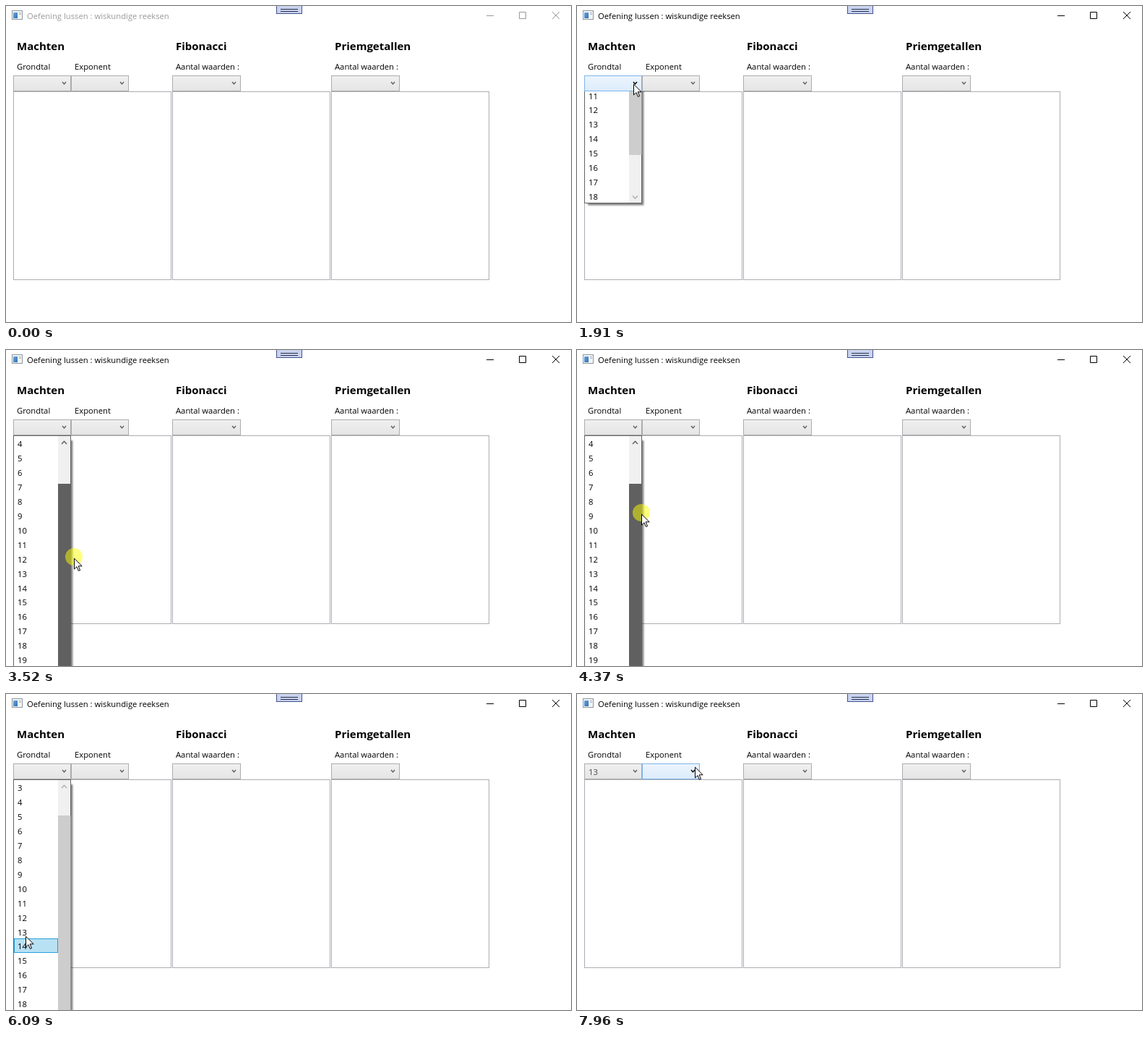
These frames come from a looping animation (782 by 437 pixels, 8000 ms). An HTML page:

```html
<!DOCTYPE html>
<html lang="nl">
<head>
<meta charset="utf-8">
<title>Oefening lussen</title>
<style>
  html, body { margin: 0; width: 100%; height: 100%; overflow: hidden; background: #fff; }
  svg { display: block; }
  text { font: 11.25px "Open Sans", "Noto Sans", sans-serif; fill: #000; white-space: pre; }
  .head { font-size: 15px; font-weight: 700; }
  .line { fill: none; }
</style>
</head>
<body>
<svg id="stage" width="782" height="437" viewBox="0 0 782 437">
  <defs>
    <linearGradient id="plain" x2="0" y2="1">
      <stop stop-color="#f0f0f0"/><stop offset="1" stop-color="#e5e5e5"/>
    </linearGradient>
    <linearGradient id="hover" x2="0" y2="1">
      <stop stop-color="#ecf4fc"/><stop offset="1" stop-color="#dcecfc"/>
    </linearGradient>
    <linearGradient id="pane" x2="1" y2="1">
      <stop stop-color="#6aa9dc"/><stop offset="1" stop-color="#2f6db5"/>
    </linearGradient>
    <filter id="soft" x="-20%" y="-5%" width="140%" height="110%">
      <feGaussianBlur stdDeviation="1.2"/>
    </filter>
    <clipPath id="below"><rect x="10" y="118" width="100" height="400"/></clipPath>
  </defs>
  <rect width="782" height="437" fill="#fff"/>

  <g id="icon">
    <rect x="8.5" y="6.5" width="14" height="12" fill="#f3f5f7" stroke="#8e979f"/>
    <rect x="10" y="9" width="6" height="8" fill="url(#pane)"/>
    <path d="M18 9.5h3M18 11.5h3" stroke="#a9b1b8"/>
  </g>
  <g id="tab">
    <rect x="374.5" y="-1" width="35" height="11.5" fill="#c9d3ee" stroke="#44528f"/>
    <path d="M380 4.5h24M380 7.5h24" stroke="#28304f"/>
  </g>
  <text id="title" x="29" y="18">Oefening lussen : wiskundige reeksen</text>
  <path id="buttons" class="line" d="M665 13.5h10M710.5 8.5h9v9h-9zM756 8l10 10M766 8l-10 10"/>

  <g id="form"></g>
  <text id="chosen" x="16" y="111.5" style="fill:#484848">13</text>

  <g clip-path="url(#below)">
    <g id="popup">
      <rect x="15" y="125" width="77.3" height="355.5" fill="#000" opacity=".5" filter="url(#soft)"/>
      <rect x="10.5" y="118.5" width="79" height="359" fill="#fff" stroke="#646464"/>
      <rect x="72" y="119" width="17" height="358" fill="#f0f0f0"/>
      <rect id="thumb" x="72" width="17.5" height="275"/>
      <path id="arrows" class="line" d="M77 130l3.5-3.7 3.5 3.7M77 467.5l3.5 3.7 3.5-3.7" stroke-width="1.5"/>
      <rect id="mark" x="11.5" width="60" height="19" fill="#b9e1f4" stroke="#26a0da"/>
      <g id="items"></g>
    </g>
  </g>

  <g id="pointer">
    <circle id="press" r="12" fill="#ff0" fill-opacity=".5"/>
    <path d="M.5 2.2V17L4 13.7 6.4 19.4 8.6 18.6 6.2 12.8H11.2Z" fill="#fff" stroke="#000"/>
  </g>
</svg>
<script>
const LOOP = 8000, STEP = 78, LAG = 2 * STEP;
const PITCH = 19.95, ROWS = 18, NOTCH = 16.2, HEIGHT = 360;
const ACTIVE = 1600, OPEN = 1910, GRAB = 2900, DROP = 4910, PICK = 6630, CLOSE = 6800;

// Each move starts where the one before it stopped; ease 1 is linear, more slows towards the end
let from = [183, 402];
const moves = [];
function move(start, end, x, y, ease = 2) {
  moves.push({ start, end, ease, from, to: [x, y], steps: Math.round((end - start) / STEP) });
  from = [x, y];
}
move(500, 1290, 80, 107);
move(1540, 1670, 78, 106);
move(2280, 2730, 81, 148);
move(2975, 3690, 95, 300);
move(3750, 3830, 97, 308);
move(3980, 4760, 85, 188, 1.5);
move(DROP, 5460, 26, 320, 1);
move(5610, 5690, 30, 341);
move(6010, 6230, 26, 330);
move(7350, 7960, 163, 99);

const $ = id => document.getElementById(id);
const within = (v, a, b) => v >= a && v < b;
const show = (el, on) => el.setAttribute("visibility", on ? "inherit" : "hidden");

function add(parent, tag, attrs, text) {
  const el = document.createElementNS("http://www.w3.org/2000/svg", tag);
  for (const k in attrs) el.setAttribute(k, attrs[k]);
  if (text) el.textContent = text;
  parent.appendChild(el);
  return el;
}

const form = $("form"), combos = [];
const label = (x, y, text, cls = "") => add(form, "text", { x, y, class: cls }, text);

function combo(x, w, text) {
  label(x + 5, 88, text);
  const box = add(form, "rect", { x: x + .5, y: 96.5, width: w - 1, height: 21 });
  const tick = add(form, "path", { class: "line", d: `M${x + w - 12} 105l2.5 3 2.5-3`, "stroke-width": 1.4 });
  combos.push(hot => {
    const on = hot && within(hot[0], x, x + w) && within(hot[1], 96, 118);
    box.setAttribute("fill", on ? "url(#hover)" : "url(#plain)");
    box.setAttribute("stroke", on ? "#7eb4ea" : "#acacac");
    tick.setAttribute("stroke", on ? "#000" : "#606060");
  });
}

["Machten", "Fibonacci", "Priemgetallen"].forEach((name, i) => {
  const x = 10 + 220 * i;
  add(form, "rect", { x: x + .5, y: 118.5, width: 218, height: 260, fill: "#fff", stroke: "#abadb3" });
  label(x + 5, 61, name, "head");
  if (i) combo(x, 95, "Aantal waarden :");
  else ["Grondtal", "Exponent"].forEach((text, k) => combo(x + 80 * k, 80, text));
});

const items = Array.from({ length: ROWS }, (_, i) =>
  add($("items"), "text", { x: 16, y: 134 + PITCH * i }));

// The pointer advances in discrete steps, as a screen recorder samples it
function pointerAt(t) {
  const m = moves.filter(m => t >= m.start).pop();
  if (!m) return null;
  const step = Math.floor((t - m.start) / (m.end - m.start) * m.steps + .05);
  const p = Math.min(1, (step + 1) / (m.steps + 1));
  const q = 1 - (1 - p) ** m.ease;
  return m.from.map((v, k) => Math.round(v + (m.to[k] - v) * q));
}

function scrollAt(t) {
  if (t < GRAB) return 0;
  const y = pointerAt(Math.min(t, DROP - 1))[1];
  return Math.max(0, Math.min(3, Math.floor((y - 148) / NOTCH)));
}

function renderPopup(t, hot) {
  const shown = Math.min(HEIGHT, 155 + 103 * Math.floor((t - OPEN) / 75));
  $("popup").setAttribute("transform", `translate(0 ${shown - HEIGHT})`);

  const top = scrollAt(t);
  items.forEach((el, i) => { el.textContent = top + i + 1; });

  const drag = within(t, GRAB + STEP, DROP);
  const onBar = within(hot[0], 72, 90) && hot[1] > 119;
  $("thumb").setAttribute("y", Math.round(136 + top * NOTCH));
  $("thumb").setAttribute("fill", drag ? "#606060" : onBar ? "#a6a6a6" : "#cdcdcd");
  $("arrows").setAttribute("stroke", drag || onBar ? "#606060" : "#a8b2ba");

  const row = Math.floor((hot[1] - 119) / PITCH);
  show($("mark"), t >= DROP && within(hot[0], 11, 72));
  $("mark").setAttribute("y", Math.round(119 + row * PITCH) + .5);
}

function render(t) {
  const pos = pointerAt(t), hot = pointerAt(t - LAG);
  const ink = t >= ACTIVE ? "#000" : "#999";
  $("title").style.fill = ink;
  $("buttons").setAttribute("stroke", ink);
  combos.forEach(paint => paint(hot));
  show($("chosen"), t >= CLOSE);

  show($("pointer"), pos);
  if (pos) $("pointer").setAttribute("transform", `translate(${pos})`);
  const pressed = within(t, ACTIVE, OPEN) || within(t, GRAB, DROP) || within(t, PICK, PICK + STEP);
  $("press").setAttribute("display", pressed ? "inline" : "none");

  const open = within(t, OPEN, CLOSE);
  $("popup").setAttribute("display", open ? "inline" : "none");
  if (open) renderPopup(t, hot);
}

const begin = performance.now();
function frame() {
  render((performance.now() - begin) % LOOP);
  requestAnimationFrame(frame);
}
frame();
</script>
</body>
</html>
```
